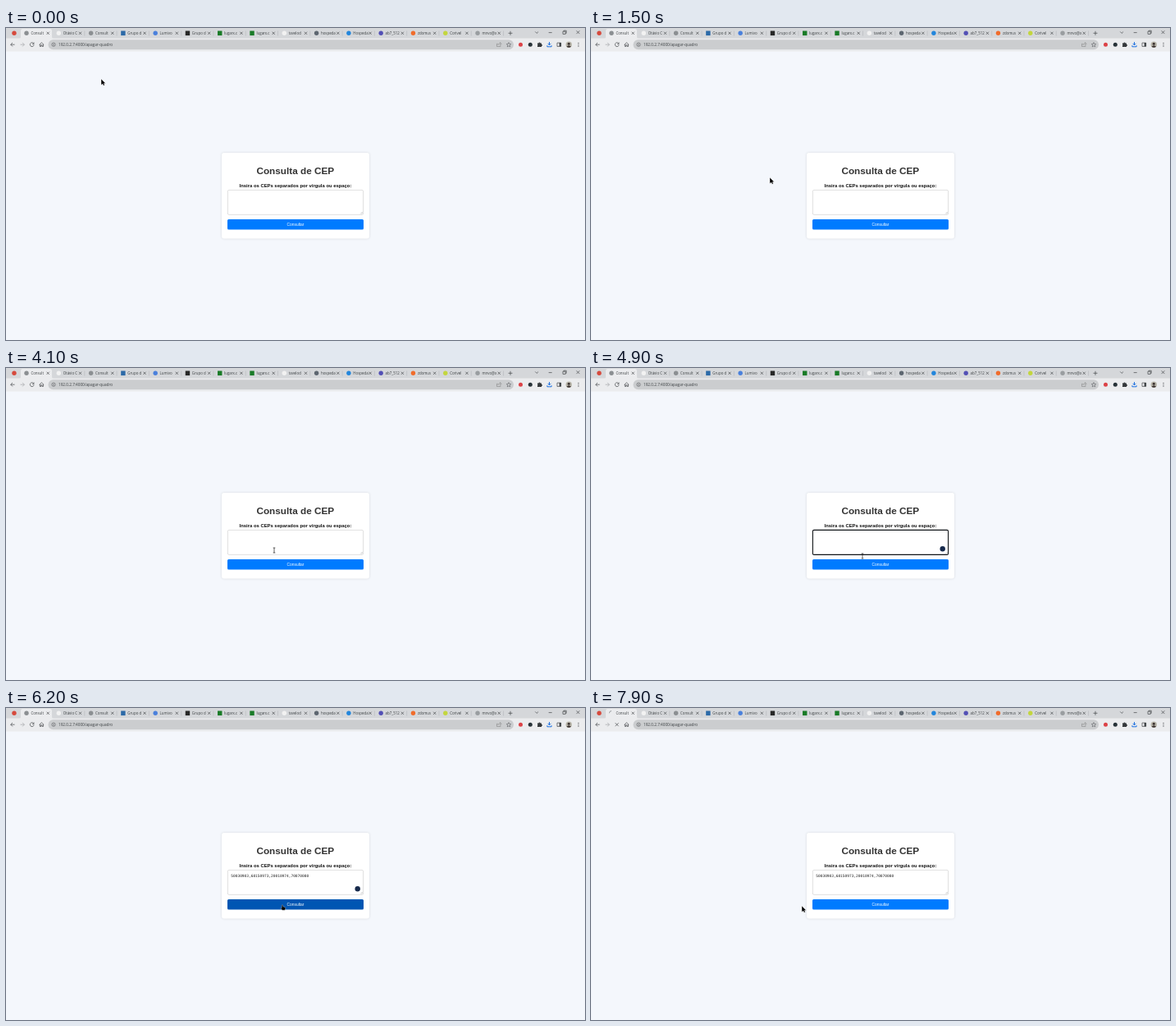
An HTML page for the animation above (8000 ms loop, 706 by 380 pixels).

```html
<!DOCTYPE html>
<html lang="pt-BR">
<head>
<meta charset="utf-8">
<title>Consulta de CEP</title>
<style>
  html, body { margin: 0; width: 100%; height: 100%; overflow: hidden; background: #f4f7fc; }
  svg { display: block; width: 100%; height: 100%; }
  text { font-family: "Open Sans", "Noto Sans", sans-serif; fill: #3c4043; white-space: pre; }
  .page text { font-family: "Liberation Sans", Arial, sans-serif; text-anchor: middle; }
  .page .mono { font: 4.5px "DejaVu Sans Mono", monospace; text-anchor: start; fill: #222; }
  .bold { font-weight: 700; }
  .line { fill: none; stroke: #44474a; stroke-width: .7; }
  .card { filter: drop-shadow(0 0 1.6px rgba(0, 0, 0, .12)); }
</style>
</head>
<body>
<svg viewBox="0 0 706 380">
  <rect width="706" height="380" fill="#f4f7fc"/>
  <rect width="706" height="13" fill="#d5d7da"/>
  <rect y="12.5" width="706" height="16" fill="#ebecee"/>
  <path d="M16 13q2 0 2-2V3.500q0-2.500 2.500-2.500h33q2.500 0 2.500 2.500V11q0 2 2 2z" fill="#ebecee"/>
  <g id="tabs" font-size="4.5"></g>
  <path class="line" d="M612.500 6.300h5M615 3.800v5M645.300 4.500l1.900 1.900 1.900-1.900M661.700 5.600h4M679 4.200h3.200v3.200h-3.200zM680 4v-.8h3.200v3.200h-.8M695.600 3.300l3.800 3.800m0-3.800l-3.800 3.800"/>

  <path class="line" d="M10.600 20.200H5.800m2.200-2.300l-2.300 2.300 2.300 2.300"/>
  <path class="line" d="M17.500 20.200h4.800m-2.200-2.300l2.300 2.300-2.300 2.300" style="stroke:#a2a5a8"/>
  <path id="reload" class="line" d="M33.600 18.700a2.400 2.400 0 1 0 .5 1.700M34 17.500v1.900h-1.900"/>
  <path id="stop" class="line" d="M29.600 18.200l4 4m0-4l-4 4"/>
  <path class="line" d="M40.600 20.400l2.800-2.600 2.800 2.600M41.400 20v2.500h1.300v-1.700h1.400v1.700h1.300V20"/>
  <rect x="51.500" y="14.200" width="567.500" height="12" rx="6" fill="#cbcdcf"/>
  <circle class="line" cx="58" cy="20.200" r="2.200" style="stroke-width:.5"/>
  <path class="line" d="M58 19.900v1.500m0-2.600v.5"/>
  <text x="64" y="22" font-size="4.700">192.0.2.7:4000/apagar-quadro</text>
  <path class="line" d="M599.800 19.300h-1.300v3.200h4.500v-1M600 21c.2-1.700 1.200-2.200 2.600-2.200v-1.200l1.500 1.700-1.500 1.600v-1" style="stroke:#777;stroke-width:.5"/>
  <path class="line" d="M613 17.600l.8 1.800 1.900.2-1.400 1.300.4 1.900-1.700-1-1.700 1 .4-1.900-1.400-1.300 1.900-.2z" style="stroke-width:.5"/>
  <circle cx="627.500" cy="20.200" r="2.500" fill="#dc4347"/>
  <circle cx="639.300" cy="20.200" r="2.500" fill="#273238"/>
  <path d="M648 18.500h1.500a1 1 0 0 1 2 0h1.500v1.500a1 1 0 0 1 0 2v1H648v-1.400a1 1 0 0 0 0-1.600z" fill="#34383b"/>
  <path d="M662.500 17v3.800m-1.900-1.900l1.900 1.900 1.900-1.900M659.900 21.200v1.600h5.200v-1.600" fill="none" stroke="#1b6fe0"/>
  <path class="line" d="M672 18.100h4.700v4.300H672z"/>
  <path d="M674.700 18h2v4.400h-2z" fill="#34383b"/>
  <circle cx="686.300" cy="20.200" r="3.700" fill="#b8b5a9"/>
  <path d="M683.500 22.700q2.800-3 5.600 0-2.800 2.300-5.600 0z" fill="#3b3230"/>
  <circle cx="686.300" cy="19.200" r="1.500" fill="#3b3230"/>
  <path d="M698 18.300v.1m0 1.800v.1m0 1.800v.1" stroke="#44474a" stroke-linecap="round" stroke-width="1.100"/>

  <g class="page">
    <rect class="card" x="263" y="152" width="180" height="104.500" rx="3" fill="#fff"/>
    <text class="bold" x="352.800" y="177.700" font-size="11.770" style="fill:#333">Consulta de CEP</text>
    <text class="bold" x="353" y="193.500" font-size="5.880" style="fill:#111">Insira os CEPs separados por vírgula ou espaço:</text>
    <rect id="field" x="270.400" y="197.400" width="165.200" height="30" rx="1.500" fill="#fff"/>
    <path d="M432.200 226.400l2.500-2.500m-1.100 2.500l1.100-1.100" stroke="#888" stroke-width=".4"/>
    <text id="codes" class="mono" x="274.300" y="206">50030903,60150973,20010974,70070080</text>
    <path id="caret" d="M0 201.500v5.500" stroke="#000" stroke-width=".6"/>
    <circle id="badge" cx="428.700" cy="220.300" r="3.200" fill="#172a4c"/>
    <rect id="button" x="270" y="233" width="166" height="12.600" rx="1.500"/>
    <text x="353" y="241" font-size="4.900" style="fill:#fff">Consultar</text>
  </g>

  <g id="arrow"><path d="M0 0v7.600l1.800-1.500 1.100 2.100 1.400-.7-1-2h2.200z" fill="#000" stroke="#fff" stroke-width=".4"/></g>
  <g id="beam"><path d="M-1.300-3h2.600M0-3v6M-1.300 3h2.600" fill="none" stroke="#222" stroke-width=".7"/></g>
  <g id="hand"><path d="M-.7 0q.8-.7 1.400.1l.2 1.900 2.300.7q.8.300.6 1.200L3.200 6.200H-.2L-2 3.700q.1-.8 1.300-.2z" fill="#000" stroke="#fff" stroke-width=".3"/></g>
</svg>
<script>
const $ = id => document.getElementById(id);
const show = (id, on) => $(id).setAttribute('visibility', on ? 'visible' : 'hidden');

// Tab label, icon colour, and "s" for a square icon
const tabs = [
  ['Consult', '#8b8f92'], ['Otávio C', '#f2f2f2'], ['Consult', '#8b8f92'], ['Grupo d', '#2c6aa8', 's'],
  ['Lumivo', '#4a80dc'], ['Grupo d', '#272727', 's'], ['lugarx.c', '#197b27', 's'], ['lugarx.c', '#197b27', 's'],
  ['tavelod', '#f2f2f2'], ['hospeda', '#5d6670'], ['Hospeda', '#2386dc'], ['ab7_512', '#5350b5'],
  ['zdomus', '#f06c2c'], ['Corivel', '#c3d63e'], ['mnvo@x', '#999da0']
];
const icon = (x, color, square, id = '') => square
  ? `<rect x="${x - 2.7}" y="3.500" width="5.400" height="5.600" fill="${color}"/>`
  : `<circle ${id} cx="${x}" cy="6.300" r="2.700" fill="${color}"/>`;

$('tabs').innerHTML = icon(10, '#d64a3d') + tabs.map(([label, color, square], i) => {
  const x = 25 + i * 39.29;
  return icon(x, color, square, i ? '' : 'id="favicon"') +
    `<text x="${x + 5.4}" y="8" font-size="4.400">${label}</text>` +
    `<path class="line" d="M${x + 24.6} 4.700l3.200 3.200m0-3.200l-3.200 3.200"/>` +
    (i ? `<path d="M${x + 31.5} 3.500v6" stroke="#a5a8ab" stroke-width=".4"/>` : '');
}).join('') + '<path id="spinner" d="M25 3.600a2.700 2.700 0 0 1 2.700 2.700" fill="none" stroke="#8b8f92" stroke-width=".8"/>';

// Pointer path: time, x, y
const path = [
  [0, 116, 62], [700, 243.5, 171.5], [1400, 243.5, 171.5], [1500, 218, 182],
  [3200, 218, 182], [3600, 239, 173.5], [3700, 239, 173.5], [4100, 327, 222],
  [4300, 327, 222], [4400, 331, 229], [5800, 331, 229], [6100, 337, 240],
  [6500, 337, 240], [6800, 257, 241], [8000, 257, 241]
];
function pointer(t) {
  const i = path.findIndex(p => p[0] > t);
  const [a, b] = [path[i - 1], path[i]];
  const k = (t - a[0]) / (b[0] - a[0]);
  return [a[1] + (b[1] - a[1]) * k, a[2] + (b[2] - a[2]) * k];
}

function draw(now) {
  const t = Math.floor(now % 8000 / 100) * 100;
  const [x, y] = pointer(t);
  const inside = x > 270 && x < 436;
  const hover = inside && y >= 232 && y < 246;
  const kind = hover ? 'hand' : inside && y > 197 && y < 231 ? 'beam' : 'arrow';
  for (const id of ['arrow', 'beam', 'hand']) show(id, id === kind);
  $(kind).setAttribute('transform', `translate(${x} ${y})`);

  const focus = t >= 4400 && t < 6100;
  const pasted = t >= 5300;
  $('field').setAttribute('stroke', focus ? '#101418' : '#c9c9c9');
  $('field').setAttribute('stroke-width', focus ? 1.1 : .6);
  $('button').setAttribute('fill', hover ? '#0056b3' : '#007bff');
  show('codes', pasted);
  show('caret', focus && (t < 4900 || pasted));
  $('caret').setAttribute('transform', `translate(${pasted ? 369 : 274.5} 0)`);
  show('badge', t >= 4600 && t < 6700);

  const loading = t >= 6500;
  show('reload', !loading);
  show('stop', loading);
  show('favicon', !loading);
  show('spinner', loading);
  $('spinner').setAttribute('transform', `rotate(${(7900 - t) * .24 - 90} 25 6.300)`);
}

const start = performance.now();
(function frame() {
  draw(performance.now() - start);
  requestAnimationFrame(frame);
})();
</script>
</body>
</html>
```
